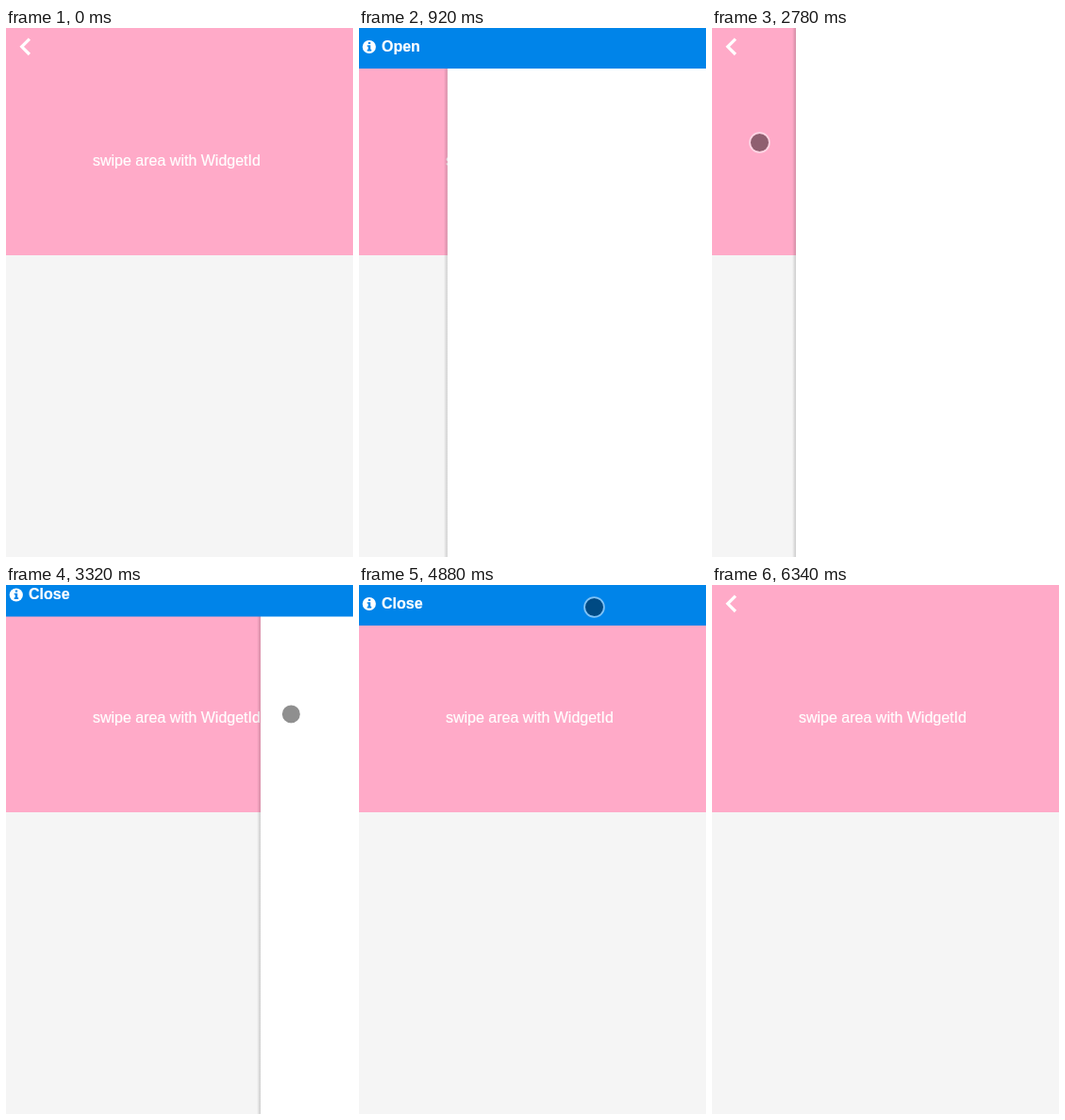
Recreate the animation shown at these times as an HTML page. Size 368 px wide and 561 px high, loop 6820 ms.

```html
<!DOCTYPE html>
<html lang="en">
<head>
<meta charset="utf-8">
<title>Swipe panel</title>
<style>
  html, body { margin: 0; width: 100%; height: 100%; overflow: hidden; background: #f5f5f5; }
  svg { display: block; width: 368px; height: 561px; }
  text { font: 16px Arial, "Liberation Sans", sans-serif; fill: #fff; stroke: #fff; stroke-width: .2; }
  .bold { font-weight: bold; }
</style>
</head>
<body>
<svg viewBox="0 0 368 561">
  <defs>
    <linearGradient id="shade">
      <stop offset="0" stop-opacity="0"/>
      <stop offset="1" stop-opacity=".17"/>
    </linearGradient>
  </defs>
  <rect width="368" height="561" fill="#f5f5f5"/>
  <rect width="368" height="241" fill="#ffaac8"/>
  <path d="M24.9 11.6 16.7 19.8 24.9 28" fill="none" stroke="#fff" stroke-width="3.2"/>
  <text x="92" y="146">swipe area with WidgetId</text>

  <g id="panel">
    <rect x="85" width="4" height="561" fill="url(#shade)"/>
    <rect x="89" width="279" height="561" fill="#fff"/>
  </g>

  <g id="header">
    <rect width="368" height="43" fill="#0084e9"/>
    <circle cx="10.8" cy="20" r="7.1" fill="#fff"/>
    <path d="M9.8 15h2.4v2h-2.4zM8.7 18.2h3.5v4.6h1v1.6H8.7v-1.6h1v-3h-1z" fill="#0084e9"/>
    <text id="label" class="bold" x="24" y="25">Open</text>
  </g>

  <g id="cursor">
    <circle r="9.6" fill="#000" fill-opacity=".44"/>
    <circle r="10.4" fill="none" stroke="#fff" stroke-opacity=".5" stroke-width="1.8"/>
  </g>
</svg>
<script>
const LOOP = 6820, TICKS = 88, TICK = LOOP / TICKS;
const PANEL = { width: 279, slide: 4.77 };
const HEADER = { height: 43, slide: 3.77 };
// Moments in ticks
const OPEN = 8.045, TAP = 23, CLOSE = 41.2, SECOND_TAP = 66;

// Cursor visits as waypoints: tick, x, y; hidden between visits
const visits = [
  [[1, 350, 170], [9, 30.5, 151.5]],
  [[17, 70.5, 155.5], [20, 145.5, 25.5], [22, 145.5, 25.5], [28, 94.5, 116.5],
   [29, 94.5, 116.5], [36, 50.5, 121.5], [39, 39.5, 121.5], [40, 39.5, 121.5], [44, 390, 142]],
  [[56, 358.5, 141.5], [63, 249.5, 23.5], [70, 249.5, 23.5],
   [74, 232.5, 204.5], [79, 276.5, 501.5], [82, 296, 575]]
];

const $ = id => document.getElementById(id);

// CSS "ease": cubic-bezier(.25, .1, .25, 1), solved by bisection
function ease(u) {
  if (u <= 0) return 0;
  if (u >= 1) return 1;
  let s = 0.5;
  for (let d = 0.25; d > 1e-5; d /= 2) {
    s += 0.75 * s * (1 - s) + s ** 3 < u ? d : -d;
  }
  return 0.3 * s * (1 - s) ** 2 + 3 * s * s * (1 - s) + s ** 3;
}

function place(id, x, y, visible) {
  $(id).setAttribute("transform", `translate(${x} ${y})`);
  $(id).setAttribute("visibility", visible ? "visible" : "hidden");
}

function drawCursor(n) {
  const visit = visits.find(v => n >= v[0][0] && n <= v.at(-1)[0]);
  if (!visit) return place("cursor", 0, 0, false);
  const i = visit.findIndex((p, k) => k > 0 && p[0] >= n);
  const [t0, x0, y0] = visit[i - 1], [t1, x1, y1] = visit[i];
  const k = (n - t0) / (t1 - t0);
  place("cursor", x0 + (x1 - x0) * k, y0 + (y1 - y0) * k, true);
}

function drawTick(n) {
  const since = (start, length) => ease((n - start) / length);

  const away = 1 - since(OPEN, PANEL.slide) + since(CLOSE, PANEL.slide);
  place("panel", PANEL.width * away, 0, away < 0.999);

  const start = n < TAP ? OPEN : CLOSE;
  const shown = n < SECOND_TAP ? since(start, HEADER.slide) : 0;
  place("header", 0, HEADER.height * (shown - 1), shown > 0);
  $("label").textContent = n < TAP ? "Open" : "Close";

  drawCursor(n);
}

const began = performance.now();
function draw() {
  const t = (performance.now() - began) % LOOP;
  // Each tick shows slightly ahead of its nominal time
  drawTick(Math.floor(t / TICK + 0.2) % TICKS);
  requestAnimationFrame(draw);
}
draw();
</script>
</body>
</html>
```
